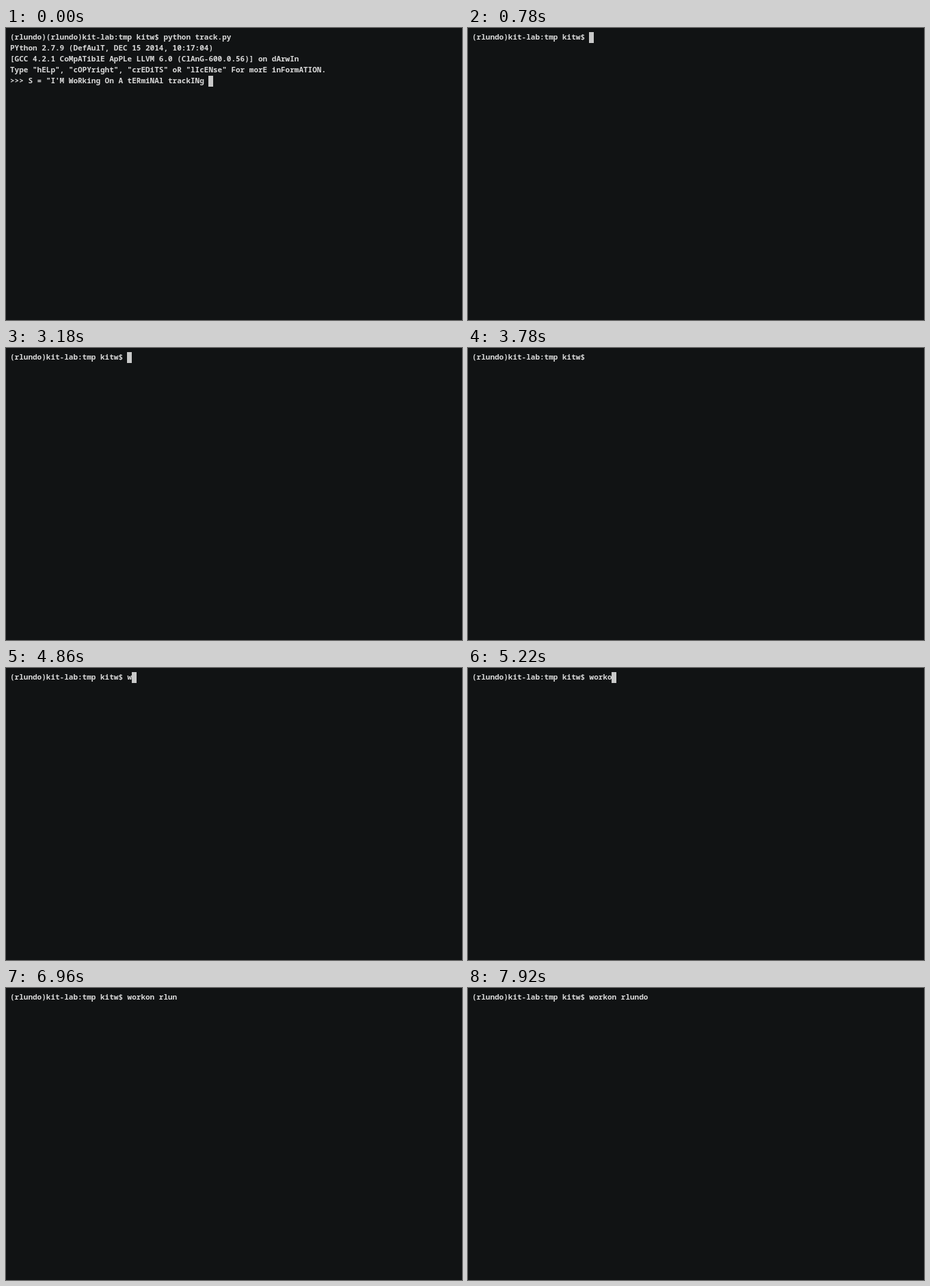
Animation of 667 by 428 pixels, one loop 8000 ms. Source, as an HTML page:

```html
<!DOCTYPE html>
<html lang="en">
<head>
<meta charset="utf-8">
<title>Terminal</title>
<style>
  html, body { margin: 0; width: 100%; height: 100%; overflow: hidden; background: #111314; }
  pre {
    position: absolute; left: 6px; top: 5px; margin: 0;
    font: 600 11px/16px "Noto Sans Mono", monospace;
    font-variant-ligatures: none; color: #d9d9d9;
  }
  #cursor { position: absolute; width: 7px; height: 16px; background: #c9c9c9; }
</style>
</head>
<body>
<pre id="screen"></pre>
<div id="cursor"></div>
<script>
const LOOP = 8000, BLINK = 600, CHAR = 6.6, ROW = 16;
const screen = document.getElementById("screen");
const cursor = document.getElementById("cursor");

const prompt = "(rlundo)kit-lab:tmp kitw$ ";
const session = `(rlundo)${prompt}python track.py
PYthon 2.7.9 (DefAulT, DEC 15 2014, 10:17:04)
[GCC 4.2.1 CoMpATiblE ApPLe LLVM 6.0 (ClAnG-600.0.56)] on dArwIn
Type "hELp", "cOPYright", "crEDiTS" oR "lIcENse" For morE inFormATION.
>>> S = "I'M WoRking On A tERmiNAl trackINg `;

// One time per key of the command, the last one being Enter.
const command = "workon rlundo\n";
const keyTimes = [4860, 4920, 5040, 5160, 5220, 5340, 5460,
                  5820, 5880, 6120, 6360, 7080, 7140, 7320];
const clearTime = 780;

function draw(now) {
  const t = now % LOOP;
  const typed = keyTimes.filter(k => k <= t).length;
  const text = t < clearTime ? session : prompt + command.slice(0, typed);
  const lastChange = t < clearTime ? 0 : typed ? keyTimes[typed - 1] : clearTime;
  // The opening screen holds its cursor; afterwards every key restarts the blink.
  const visible = t < clearTime || Math.floor((t - lastChange) / BLINK) % 2 === 0;

  const lines = text.split("\n");
  if (screen.textContent !== text) screen.textContent = text;
  cursor.style.left = Math.floor(6 + lines.at(-1).length * CHAR) + "px";
  cursor.style.top = 6 + (lines.length - 1) * ROW + "px";
  cursor.style.visibility = visible ? "visible" : "hidden";
}

const start = performance.now();
function tick() {
  draw(performance.now() - start);
  requestAnimationFrame(tick);
}
tick();
</script>
</body>
</html>
```
